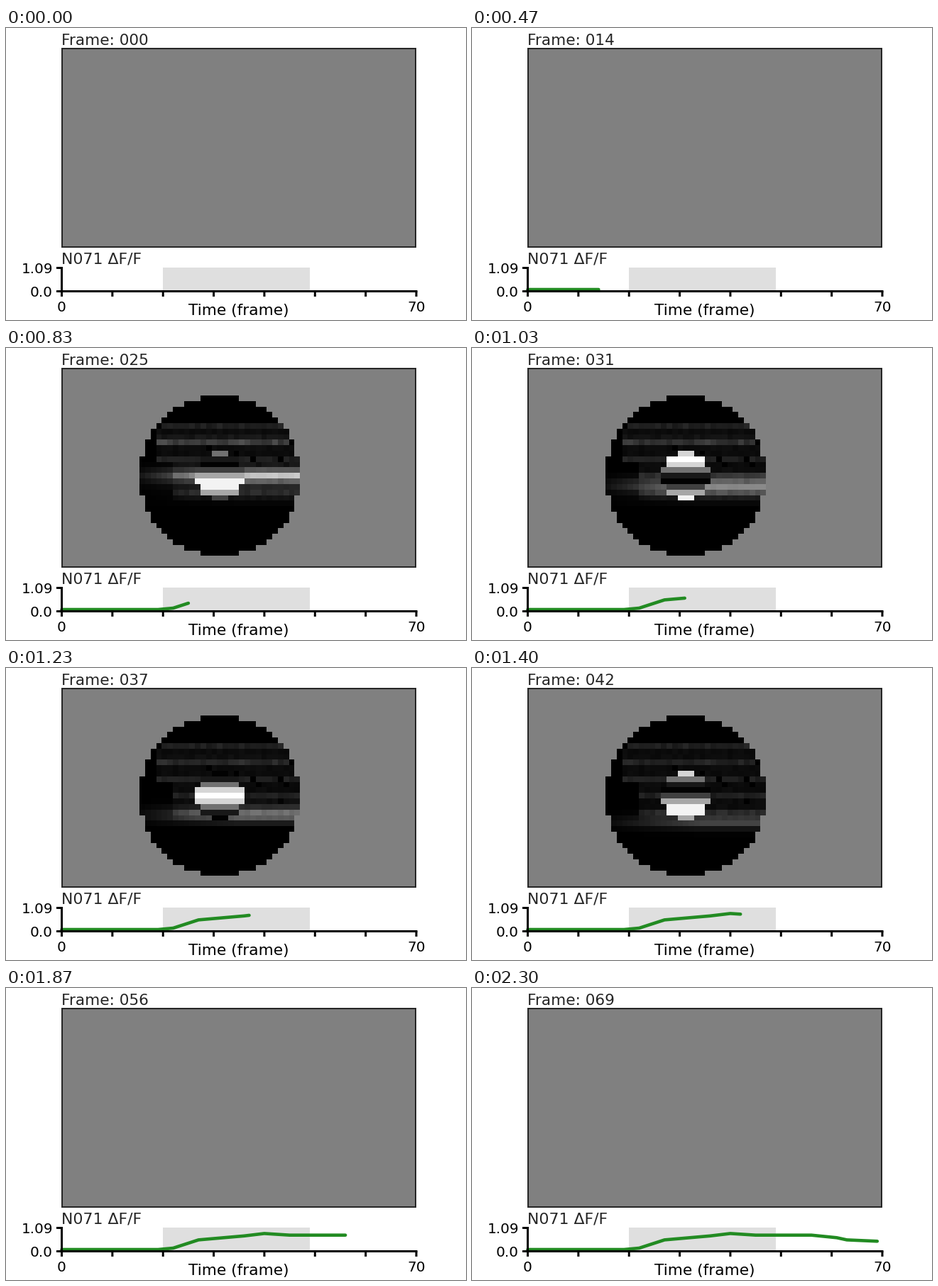
Recreate the animation shown at these times as a matplotlib script. Size 648 px wide and 412 px high, loop 2.33 s.

```python
import numpy as np
import matplotlib.pyplot as plt
from matplotlib.animation import FuncAnimation
from matplotlib.patches import Rectangle

W, H = 648, 412
LOOP, STEP = 2330, 10
COLS, ROWS = 64, 36
X0, X70, Y_ZERO, Y_MAX = 78.5, 578, 371.5, 338.5
STIM_ON, STIM_OFF = 20, 49
INK = "#262626"

plt.rcParams["font.family"] = "DejaVu Sans"
fig = plt.figure(figsize=(W / 72, H / 72), dpi=72, facecolor="white")
ax = fig.add_axes([0, 0, 1, 1])
ax.axis("off")


def time_x(t):
    return X0 + (X70 - X0) * t / 70


# Stimulus grid: a large disk with a small grating disk at its centre.
r, c = np.mgrid[:ROWS, :COLS]
dist2 = (r - 19) ** 2 + (c - 28) ** 2
disk = dist2 <= 210
core = dist2 <= 18.5


def make_texture():
    """Dim speckled rows, every third one brighter, with a few dark gaps."""
    rng = np.random.default_rng(4)
    level = 18 + 14 * np.cos(2 * np.pi * (r - 10) / 3)
    inside = (r >= 10) & (r <= 23) & (c >= np.where(r < 17, 17, 20))
    speckle = rng.uniform(0.75, 1.25, r.shape)
    gaps = rng.random(r.shape) < 0.04
    return level * speckle * inside * ~gaps


texture = make_texture()
ramp = np.clip((c - 11) / 20, 0, 1)


def surround(n):
    """Static texture with a bright band that sinks and fades."""
    fade = np.sqrt(np.clip((46 - n) / 21, 0, 1))
    d = r - (18.9 + 0.28 * (n - 25))
    glow = 125 * np.exp(-d ** 2 / 1.7)
    tail = np.where((d > 0) & (r < 25), 42 * np.exp(-d / 2.4), 0)
    upper = 1.3 * fade ** 3 * np.exp(-(r - 12.5) ** 2)
    return texture * (1 + upper) + fade * ramp * (glow + tail)


def stimulus(n):
    img = np.full((ROWS, COLS), 128.0)
    if STIM_ON <= n < STIM_OFF:
        peak = 20.5 + 0.5 * (n - 25)
        grating = 127.5 * (1 + np.cos(2 * np.pi * (r - peak) / 7.5))
        img[disk] = surround(n)[disk]
        img[core] = grating[core]
    return img


# Response trace: (time, height on the stage)
KEYS = [(0, 369), (19, 369), (22, 367), (27, 355.4), (36, 349.8), (40, 346.4),
        (45, 348.7), (56, 348.7), (61, 352.3), (63, 355.4), (69, 357.3)]
times = np.arange(70)
trace_x = time_x(times)
trace_y = np.interp(times, *zip(*KEYS))


def label(x, y, text, size, color="black", ha="left"):
    return ax.text(x, y, text, size=size, color=color, ha=ha, va="baseline")


def axis_line(xs, ys):
    ax.plot(xs, ys, color="black", lw=3, solid_capstyle="butt", zorder=4,
            snap=False)


view = ax.imshow(stimulus(0), cmap="gray", vmin=0, vmax=255, aspect="auto",
                 interpolation="nearest", extent=(79, 578, 309, 28.3))
ax.add_patch(Rectangle((79, 29), 498, 280, fill=False, ec=INK, lw=2, zorder=3))
ax.add_patch(Rectangle((time_x(STIM_ON), Y_MAX - 0.5),
                       time_x(STIM_OFF) - time_x(STIM_ON), Y_ZERO - Y_MAX,
                       fc="#dfdfdf", lw=0, zorder=1))
trace, = ax.plot([], [], color="forestgreen", lw=4.6, zorder=3, snap=False,
                 solid_capstyle="round", solid_joinstyle="round")

axis_line([X0 - 1.5, X70 + 1.5], [Y_ZERO, Y_ZERO])
axis_line([X0, X0], [Y_MAX - 1.5, Y_ZERO + 1.5])
for t in range(0, 71, 10):
    axis_line([time_x(t)] * 2, [Y_ZERO, 379])
for y in (Y_MAX, Y_ZERO):
    axis_line([71, X0], [y, y])

title = label(78.5, 24, "", 21.6, INK)
label(78.5, 333, "N071 ΔF/F", 22, INK)
label(66, 346, "1.09", 20, ha="right")
label(66, 379, "0.0", 20, ha="right")
label(78, 400, "0", 20, ha="center")
label(578.5, 400, "70", 20, ha="center")
label(328, 405, "Time (frame)", 21.8, ha="center")

ax.set_xlim(0, W)
ax.set_ylim(H, 0)


def update(i):
    n = int((i + 0.5) * 0.3)  # 30 pictures a second
    title.set_text(f"Frame: {n:03d}")
    view.set_data(stimulus(n))
    count = n + 1 if n else 0
    trace.set_data(trace_x[:count], trace_y[:count])
    return title, view, trace


anim = FuncAnimation(fig, update, frames=LOOP // STEP, interval=STEP,
                     repeat=True, repeat_delay=0, blit=False)
plt.show()
```
